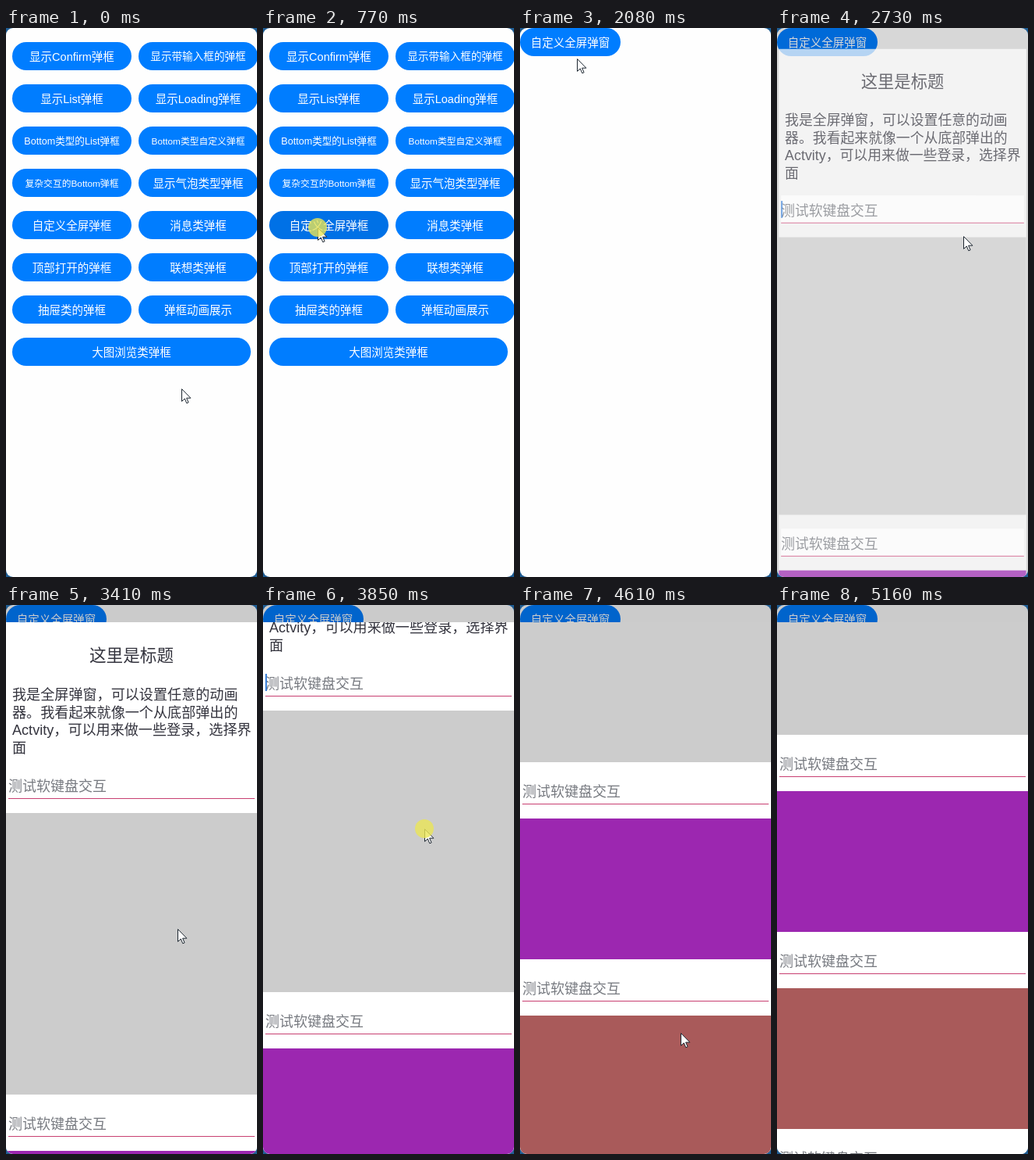
These frames come from a looping animation (322x702 px, 5810 ms). An HTML page:

```html
<!DOCTYPE html>
<html lang="zh-CN">
<head>
<meta charset="utf-8">
<title>弹框</title>
<style>
  html, body { margin: 0; width: 100%; height: 100%; overflow: hidden; background: #1f5c92; }
  body { font-family: "Liberation Sans", "Noto Sans CJK SC", "Noto Sans CJK", sans-serif; }
  body * { position: absolute; box-sizing: border-box; white-space: nowrap; }
  #stage { left: 0; top: 0; width: 322px; height: 702px; overflow: hidden; border-radius: 9px; background: #fefefe; }
  #pages { left: 0; top: 0; width: 646px; height: 702px; }
  .btn { height: 36px; border-radius: 18px; background: #007dff; color: #fff; text-align: center; line-height: 38px; }
  #scrim { inset: 0; background: #000; }
  #sheet { left: 0; top: 22px; width: 322px; height: 702px; overflow: hidden; background: rgb(255 255 255 / var(--a)); }
  #list { left: 0; top: -22px; width: 322px; }
  #list > *, .field > * { opacity: var(--a); }
  #list > .field { opacity: 1; left: 0; width: 322px; height: 72px; }
  .title { top: 50px; width: 322px; line-height: 30px; text-align: center; font-size: 21.6px; color: #34343e; }
  .text { left: 8px; top: 104px; line-height: 22.5px; font-size: 18.1px; color: #34343e; }
  .text br { position: static; }
  .hint { left: 3px; top: 18px; width: 316px; height: 36px; line-height: 40px; font-size: 18px; color: #777a80; background: #fff; }
  .rule { left: 3px; top: 53px; width: 316px; height: 1.2px; background: #c84072; }
  .block { left: 0; width: 322px; }
  #caret { left: 3px; top: 219px; width: 2px; height: 22px; background: #3a80d8; }
  #mouse { left: 0; top: 0; }
  #mouse svg { left: 0; top: 0; width: 13px; height: 20px; }
  #spot { left: -12px; top: -12px; width: 24px; height: 24px; border-radius: 50%; background: rgb(234 229 86 / .8); }
</style>
</head>
<body>
<div id="stage">
  <div id="pages"></div>
  <div id="scrim"></div>
  <div id="sheet"><div id="list">
    <div class="title">这里是标题</div>
    <div class="text">我是全屏弹窗，可以设置任意的动画<br>器。我看起来就像一个从底部弹出的<br>Actvity，可以用来做一些登录，选择界<br>面</div>
  </div></div>
  <div id="mouse">
    <svg viewBox="0 0 13 20"><path d="M.5.6V16.4L4.3 13 6.8 18.8 9.1 17.8 6.6 12.2H11.9Z" fill="#fff" stroke="#1c2630"/></svg>
    <div id="spot"></div>
  </div>
</div>
<script>
const LOOP = 5810, TICK = 110;
const $ = id => document.getElementById(id);

function add(parent, cls, css, text = '') {
  const el = document.createElement('div');
  el.className = cls;
  el.textContent = text;
  Object.assign(el.style, css);
  parent.append(el);
  return el;
}

function button(text, x, y, w, size = 14.5) {
  return add($('pages'), 'btn', { left: x + 'px', top: y + 'px', width: w + 'px', fontSize: size + 'px' }, text);
}

const labels = [
  ['显示Confirm弹框'], ['显示带输入框的弹框', 13.6],
  ['显示List弹框'], ['显示Loading弹框'],
  ['Bottom类型的List弹框', 12.6], ['Bottom类型自定义弹框', 11.8],
  ['复杂交互的Bottom弹框', 11.8], ['显示气泡类型弹框'],
  ['自定义全屏弹框'], ['消息类弹框'],
  ['顶部打开的弹框'], ['联想类弹框'],
  ['抽屉类的弹框'], ['弹框动画展示']
];
const menu = labels.map(([text, size], i) =>
  button(text, i % 2 ? 170 : 8, 18 + 54 * (i >> 1), 153, size));
button('大图浏览类弹框', 8, 396, 306);
button('自定义全屏弹窗', 323, 0, 129);

// Alternating input fields and colour blocks
let rowTop = 194;
for (const [color, h] of [['#ccc', 360], ['#9c27b0', 180], ['#a95a5a', 180], ['#ccc', 180]]) {
  const field = add($('list'), 'field', { top: rowTop + 'px' });
  add(field, 'hint', {}, '测试软键盘交互');
  add(field, 'rule', {});
  add($('list'), 'block', { top: rowTop + 72 + 'px', height: h + 'px', background: color });
  rowTop += 72 + h;
}
const caret = add($('list'), '', {});
caret.id = 'caret';

// Smooth progress 0..1 from tick a to tick b
function ease(a, b, k) {
  const u = Math.min(1, Math.max(0, (k - a) / (b - a)));
  return u * u * (3 - 2 * u);
}

// Pointer stops: tick, x, y
const stops = [
  [0, 225, 461], [4, 70, 255], [14, 70, 255], [19, 73, 39], [21, 72, 23],
  [25, 239, 266], [28, 239, 266], [33, 210, 494], [34, 210, 494],
  [35, 207, 286], [36, 203, 200], [39, 186, 490], [46, 238, 635]
];

function pointer(k) {
  let [, x, y] = stops[0];
  for (const [i, [b, bx, by]] of stops.slice(1).entries()) {
    const e = ease(stops[i][0], b, k);
    x += (bx - stops[i][1]) * e;
    y += (by - stops[i][2]) * e;
  }
  return `translate(${Math.round(x)}px, ${Math.round(y)}px)`;
}

const fling = k => k < 35 ? 0 : 460 - 329 * (Math.max(0, 46 - k) / 11) ** 2.21;
const within = (a, b, k) => k >= a && k < b;

function draw(t) {
  const k = Math.floor((t + 20) / TICK);
  const p = ease(21.4, 27, k);
  const tap = within(7, 9, k);
  const pressed = tap || k === 21 || within(34, 36, k);
  $('mouse').style.transform = pointer(k);
  $('mouse').style.visibility = k < 47 ? 'visible' : 'hidden';
  $('spot').style.opacity = pressed ? 1 : 0;
  menu[8].style.background = tap ? '#0071e6' : '#007dff';
  $('pages').style.transform = `translateX(${-Math.round(323 * ease(10.99, 14, k))}px)`;
  $('scrim').style.opacity = .2 * p ** .75;
  const sheet = $('sheet').style;
  sheet.setProperty('--a', p);
  sheet.visibility = p ? 'visible' : 'hidden';
  sheet.transform = p < 1 ? `scale(${.953 + .047 * p})` : 'none';
  $('list').style.transform = `translateY(${-Math.round(fling(k))}px)`;
  caret.style.opacity = (k + 6) % 10 < 5 ? p : 0;
}

const start = performance.now();
function tick() {
  draw((performance.now() - start) % LOOP);
  requestAnimationFrame(tick);
}
tick();
</script>
</body>
</html>
```
